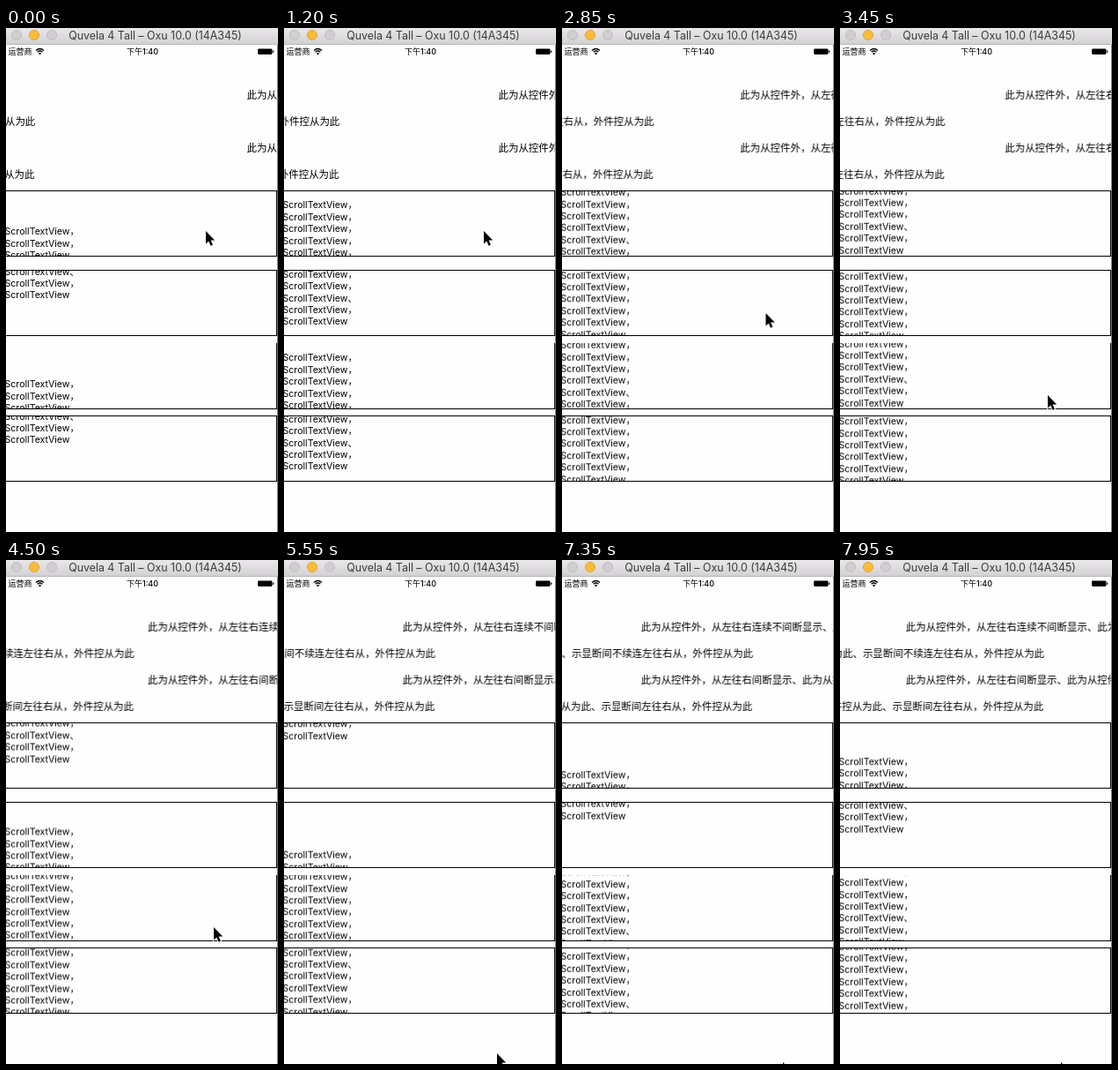
Recreate the animation shown at these times as an HTML page. Size 309 px wide and 571 px high, loop 8 s.

```html
<!DOCTYPE html>
<html lang="zh-CN">
<head>
<meta charset="utf-8">
<title>ScrollTextView</title>
<style>
html, body { margin: 0; width: 100%; height: 100%; overflow: hidden; background: #fefefe; }
body { position: relative; color: #000; font-family: Inter, "Noto Sans CJK SC", "Noto Sans CJK", sans-serif; }
#stage { position: absolute; left: 0; top: 0; width: 309px; height: 571px; overflow: hidden; }
#stage > *, .block { position: absolute; white-space: nowrap; }

.bar { left: 0; top: 0; width: 309px; height: 19px; box-sizing: border-box;
  background: linear-gradient(#e9e7e9, #d3d1d3); border-bottom: 1px solid #b7b5b7; }
.title { left: 19px; top: 0; width: 301px; text-align: center; font-size: 12.4px; line-height: 17px; color: #3c3c3c; }
.dot { top: 2px; width: 12px; height: 12px; border-radius: 50%; box-sizing: border-box;
  background: #d0ced0; border: 1px solid #bfbdbf; }
.dot.on { background: #f8bc3a; border-color: #e2a42f; }
.status { top: 20px; font-size: 9px; line-height: 14px; }
.clock { left: 105px; width: 100px; text-align: center; font-weight: 500; }
.edge { left: 308px; top: 19px; width: 1px; height: 552px; background: #777; z-index: 1; }

.line { font: 11.46px/20px "Noto Sans CJK SC", "Noto Sans CJK", sans-serif; }
.box { left: 0; width: 309px; height: 75px; box-sizing: border-box; overflow: hidden;
  border: solid #000; border-width: 1px 2px 1px 0; }
.box.open { border-top: 0; }
.block { left: -1.5px; font-size: 10.6px; line-height: 13.4px; }

/* 53 jumps of 150 ms, 3.75 px each */
.run { --x: 0px; --y: 0px; animation: run 8s -3ms infinite; }
.left { --x: -198.75px; }
.right { --x: 198.75px; }
.up { --y: -198.75px; }
.down { --y: 198.75px; }
@keyframes run {
  0% { transform: translate(0, 0); animation-timing-function: steps(53, end); }
  99.375%, 100% { transform: translate(var(--x), var(--y)); }
}

#cursor { left: -2px; top: -2px; z-index: 2; animation: point 8s -3ms infinite; }
@keyframes point {
  0% { transform: translate(227px, 230px); }
  31.875% { transform: translate(227px, 230px); animation-timing-function: steps(4, end); }
  39.375% { transform: translate(236px, 416px); }
  56.25% { transform: translate(236px, 416px); animation-timing-function: steps(4, end); }
  63.75% { transform: translate(242px, 559px); }
  80.625% { transform: translate(242px, 559px); animation-timing-function: steps(2, end); }
  84.375% { transform: translate(246px, 566px); }
  86.25% { transform: translate(246px, 566px); animation-timing-function: steps(2, end); }
  90%, 100% { transform: translate(251px, 569px); }
}
</style>
</head>
<body>
<div id="stage">
  <div class="bar"></div>
  <div class="dot" style="left:6px"></div>
  <div class="dot on" style="left:26px"></div>
  <div class="dot" style="left:46px"></div>
  <div class="title">Quvela 4 Tall – Oxu 10.0 (14A345)</div>

  <div class="status" style="left:2.5px">运营商</div>
  <svg style="left:33px;top:22px" width="11" height="9" fill="none" stroke="#000" stroke-width="1.3">
    <path d="M1 3.5Q5.5 -.5 10 3.5M2.7 5.3Q5.5 2.8 8.3 5.3"/>
    <path d="M5.5 8.4L3.9 6.7Q5.5 5.4 7.1 6.7Z" fill="#000" stroke="none"/>
  </svg>
  <div class="status clock">下午1:40</div>
  <svg style="left:285px;top:23px" width="21" height="8">
    <rect x="1" y=".5" width="16.5" height="6.5" rx="1.4"/>
    <path d="M18.5 2.5Q20 3.8 18.5 5Z" stroke="#000" stroke-width=".5"/>
  </svg>
  <div class="edge"></div>

  <div class="line run left" style="left:273.5px;top:65px">此为从控件外，从左往右连续不间断显示、此为从控件外</div>
  <div class="line run right" style="right:275.7px;top:95px">外件控从为此、示显断间不续连左往右从，外件控从为此</div>
  <div class="line run left" style="left:273.5px;top:125px">此为从控件外，从左往右间断显示、此为从控件外，从左往右</div>
  <div class="line run right" style="right:276.5px;top:155px">外件控从为此、示显断间左往右从，外件控从为此</div>

  <svg id="cursor" width="16" height="22">
    <path d="M2 2V16.5L5.3 13.4L7.6 18.7L9.9 17.7L7.6 12.5H12.2Z" stroke="#fff" stroke-width="1.6" paint-order="stroke"/>
  </svg>
</div>
<script>
const stage = document.getElementById("stage");
const cursor = document.getElementById("cursor");
const marks = "，，，，，，、，";
const text = Array.from({ length: 9 }, (_, i) => "ScrollTextView" + (marks[i] || "")).join("<br>");

// A box with two copies of the text; start is the stage y of the first copy
function addBox(top, start, pitch, way, open) {
  const box = document.createElement("div");
  box.className = open ? "box open" : "box";
  box.style.top = top + "px";
  const inset = open ? 0 : 1;
  for (const y of [start, start + pitch]) {
    const block = document.createElement("div");
    block.className = "block run " + way;
    block.style.top = y - top - inset + "px";
    block.innerHTML = text;
    box.append(block);
  }
  stage.insertBefore(box, cursor);
}

addBox(184, 224.3, 196.75, "up");
addBox(274, 189.1, -196.75, "down");
addBox(357, 397.3, 120.6, "up", true);
addBox(439, 353.1, -120.6, "down");
</script>
</body>
</html>
```
